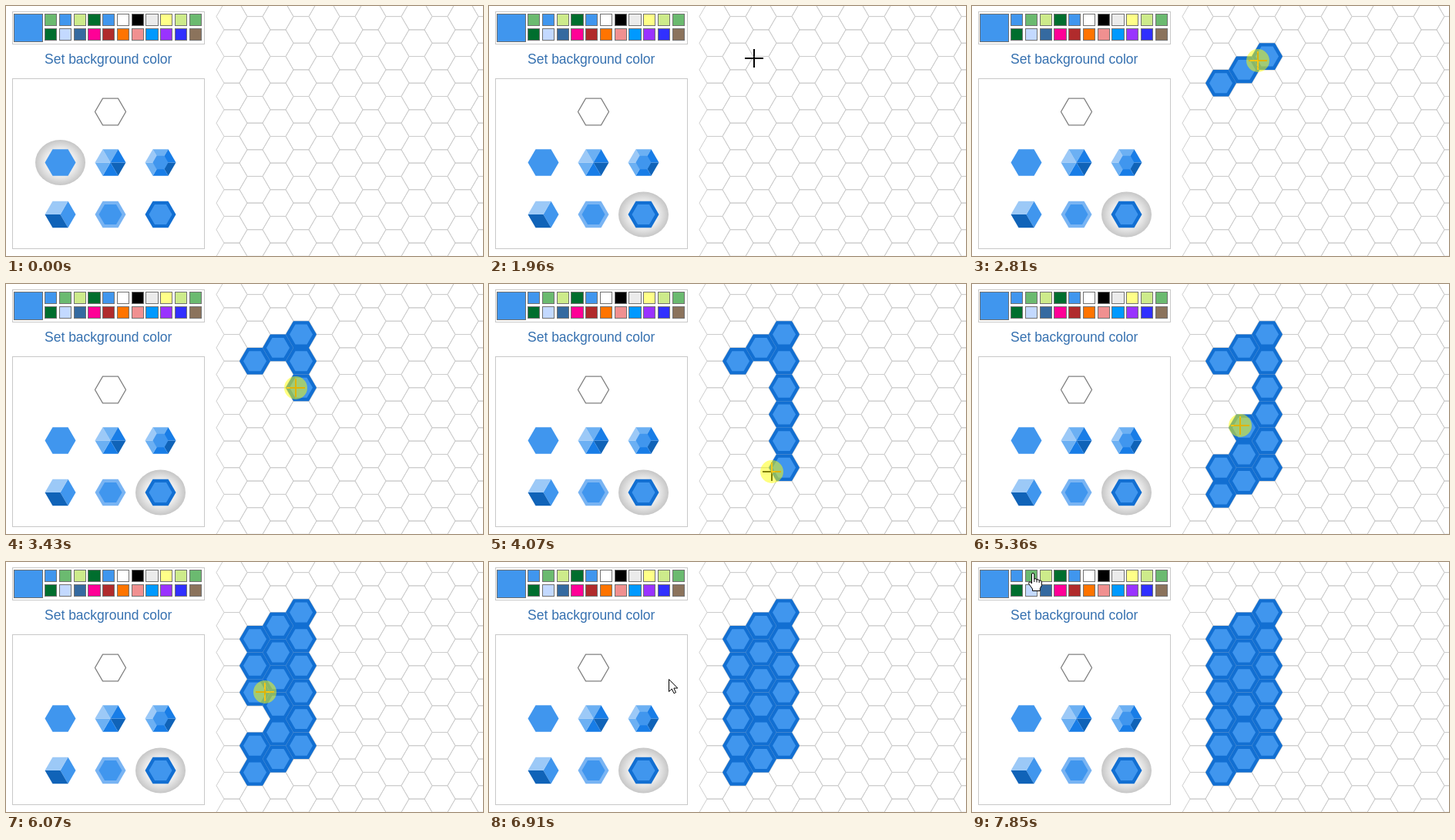
Write an HTML page that moves like this. It is 619 px wide and 325 px high and loops after 8 s.

```html
<!DOCTYPE html>
<html lang="en">
<head>
<meta charset="utf-8">
<title>Hexagon painter</title>
<style>
  html, body { margin: 0; width: 100%; height: 100%; overflow: hidden; background: #fff; }
  .panel { position: absolute; left: 8px; width: 248px; background: #fff; border: 1px solid #c8c8c8; }
  .panel::before {
    content: ""; position: absolute; inset: -7px; z-index: -1;
    border-radius: 12px; background: #efefef; box-shadow: 0 0 3px 1px #efefef;
  }
  #palette { top: 7px; height: 41px; }
  #shapes { top: 94px; height: 220px; }
  svg { position: absolute; left: 0; top: 0; display: block; }
  text { font: 17.5px "Liberation Sans", Arial, sans-serif; fill: #3671b0; }
</style>
</head>
<body>
<div class="panel" id="palette"></div>
<div class="panel" id="shapes"></div>
<svg id="stage" width="619" height="325" viewBox="0 0 619 325">
  <defs>
    <radialGradient id="halo">
      <stop offset="0" stop-color="#fff"/>
      <stop offset=".6" stop-color="#ececec"/>
      <stop offset="1" stop-color="#c6c6c6"/>
    </radialGradient>
  </defs>
  <rect x="267" width="352" height="325" fill="#fff"/>
  <text x="50" y="75">Set background color</text>
</svg>
<script>
const LOOP = 8000, R = 20, H = R * Math.sqrt(3);
const BLUE = '#4096ee', DEEP = '#126fd2', PALE = '#9cc9f7', SOFT = '#6cb0f3',
      VIVID = '#187de7', DARK = '#1063b8', GREEN = '#6bba70';
const stage = document.getElementById('stage');

function add(tag, attrs, parent = stage) {
  const el = document.createElementNS('http://www.w3.org/2000/svg', tag);
  for (const k in attrs) el.setAttribute(k, attrs[k]);
  return parent.appendChild(el);
}
const show = (el, on) => { el.style.display = on ? '' : 'none'; };

// Corner k of a flat-topped hexagon, clockwise from the right
const corner = (x, y, r, k) => [x + r * Math.cos(k * Math.PI / 3), y + r * Math.sin(k * Math.PI / 3)];
const poly = (pts, attrs, parent) =>
  add('polygon', { points: pts.map(p => p.map(v => v.toFixed(2)).join()).join(' '), ...attrs }, parent);
const hex = (x, y, r, attrs, parent) =>
  poly([0, 1, 2, 3, 4, 5].map(k => corner(x, y, r, k)), attrs, parent);
function ringed(x, y, rim, parent) {
  hex(x, y, R, { fill: rim }, parent);
  hex(x, y, 15, { fill: BLUE }, parent);
}

// Colour swatches, edges snapped to whole pixels
function swatch(x, y, w, h, fill) {
  const left = Math.round(x), right = Math.round(x + w);
  return add('rect', { x: left + .5, y: y + .5, width: right - left - 1, height: h - 1, fill, stroke: '#707070' });
}
swatch(10, 10, 38, 37, BLUE);
const rows = [
  [GREEN, BLUE, '#cdeb8b', '#006e2e', BLUE, '#fff', '#000', '#ebebeb', '#ffff88', '#cdeb8b', GREEN],
  ['#006e2e', '#c3d9ff', '#356aa0', '#ff0096', '#b02b2c', '#ff7400', '#f09090', '#0099ff', '#9933ff', '#3030ff', '#8b735c']
];
const swatches = rows.map((row, j) =>
  row.map((c, i) => swatch(50 + 18.78 * i, 10 + 19 * j, 16.2, 16, c)));

// Shape icons
const halo = add('ellipse', { rx: 32.5, ry: 29.5, fill: 'url(#halo)' });
const [X1, X2, X3, Y1, Y2] = [70.5, 135.5, 200.5, 203.5, 271];
function facets(x, y) {
  [DARK, VIVID, SOFT, PALE, SOFT, VIVID].forEach((fill, k) =>
    poly([[x, y], corner(x, y, R, k), corner(x, y, R, k + 1)], { fill }));
}
hex(X2, 137.5, R, { fill: '#fff', stroke: '#808080', 'stroke-width': 1.3 });
hex(X1, Y1, R, { fill: BLUE });
facets(X2, Y1);
facets(X3, Y1);
hex(X3, Y1, R / 2, { fill: BLUE });
[[5, BLUE], [1, DARK], [3, PALE]].forEach(([k, fill]) =>
  poly([[X1, Y2], ...[0, 1, 2].map(i => corner(X1, Y2, R, k + i))], { fill }));
ringed(X2, Y2, '#79b4f3');
ringed(X3, Y2, DEEP);

// Honeycomb
const centers = [];
for (let i = 0; i < 12; i++)
  for (let j = -4; j < 8; j++)
    centers.push([293 + 30 * i, 100.2 + H * (j + (i % 2 ? 0 : .5))]);
for (const [x, y] of centers) hex(x, y, R, { fill: 'none', stroke: '#cdcdcd' });

// Pointer path: time, x, y
const ENTER = 670, CLICK = 1250, PICK = 1390, DRAG = 2420, RELEASE = 6610;
const path = [
  [ENTER, 246, 316], [CLICK, 194, 267], [PICK, 194, 267], [1954, 344, 68], [2190, 327, 99],
  [DRAG, 327, 99], [2808, 371, 71], [2960, 376, 69], [3120, 376, 69], [3900, 376, 234],
  [4052, 367, 244], [4520, 326, 271], [4908, 324, 243], [5064, 343, 225], [5372, 348, 184],
  [5748, 349, 122], [5900, 335, 135], [6071, 336, 169], [6370, 334, 216], [RELEASE, 334, 216],
  [7370, 91, 62], [7600, 79, 8], [7850, 79, 14]
];
function pointAt(t) {
  const i = path.findIndex(p => p[0] > t);
  if (i < 0) return path[path.length - 1].slice(1);
  if (i === 0) return path[0].slice(1);
  const [a, b] = [path[i - 1], path[i]], k = (t - a[0]) / (b[0] - a[0]);
  return [1, 2].map(n => Math.round(a[n] + (b[n] - a[n]) * k));
}

// Every cell the pressed pointer crosses is painted from then on
const painted = new Map();
for (let t = DRAG; t < RELEASE; t += 10) {
  const [x, y] = pointAt(t);
  const far = c => Math.hypot(c[0] - x, c[1] - y);
  const cell = centers.reduce((a, b) => far(b) < far(a) ? b : a);
  if (painted.has(cell)) continue;
  const el = add('g', {});
  ringed(...cell, DEEP, el);
  painted.set(cell, { el, at: t });
}

// Pointers, each with its hot spot at 0,0
const cross = add('path', { d: 'M-12 0H12M0-12V-1M0 1V12', stroke: '#fff', 'stroke-width': 2 });
cross.style.mixBlendMode = 'difference';
const outline = { fill: '#fff', stroke: '#000', 'stroke-linejoin': 'round' };
const arrow = add('path', { d: 'M.5 .5V16.5L4.3 13L7 18.7L9.5 17.6L6.9 12H11.8Z', ...outline });
const hand = add('g', {});
add('path', {
  d: 'M-1.5 14V2Q-1.5 .5 0 .5T1.8 2V8Q4.5 6.8 5 9Q7.7 7.9 8.2 10Q11.2 9.2 11.4 12V16.5L9.3 20.5V23.5H-.5V21' +
     'L-5.2 14.5Q-6 12.2-4 11.8Q-2.8 12-1.5 14Z', ...outline
}, hand);
add('path', { d: 'M1.8 8V12M5 9V12.5M8.2 10V13', stroke: '#000', fill: 'none' }, hand);
const press = add('circle', { r: 15, fill: '#ff0', 'fill-opacity': .5 });

const STEP = 77.7;
const snap = t => DRAG + STEP * Math.floor((t - DRAG) / STEP + .3);
const inside = (x, y, l, t, r, b) => x >= l && x <= r && y >= t && y <= b;

function draw(now) {
  const t = snap(now % LOOP);
  const picked = t >= PICK, started = t >= DRAG;
  halo.setAttribute('cx', picked ? X3 : X1);
  halo.setAttribute('cy', picked ? Y2 : Y1);
  swatches[0][0].setAttribute('fill', started ? BLUE : GREEN);
  swatches[0][1].setAttribute('fill', started ? GREEN : BLUE);
  for (const { el, at } of painted.values()) show(el, t >= at);

  const visible = t >= ENTER;
  const [x, y] = pointAt(t);
  const onGrid = x >= 273;
  const onLink = inside(x, y, 50, 58, 215, 80) || inside(x, y, 50, 8, 254, 46) || inside(x, y, 180, 253, 221, 289);
  show(cross, visible && onGrid);
  show(hand, visible && !onGrid && onLink);
  show(arrow, visible && !onGrid && !onLink);
  show(press, (t >= CLICK && t < PICK) || (started && t < RELEASE));
  for (const el of [cross, hand, arrow, press]) el.setAttribute('transform', `translate(${x} ${y})`);
}

const start = performance.now();
function tick() {
  draw(performance.now() - start);
  requestAnimationFrame(tick);
}
tick();
</script>
</body>
</html>
```
